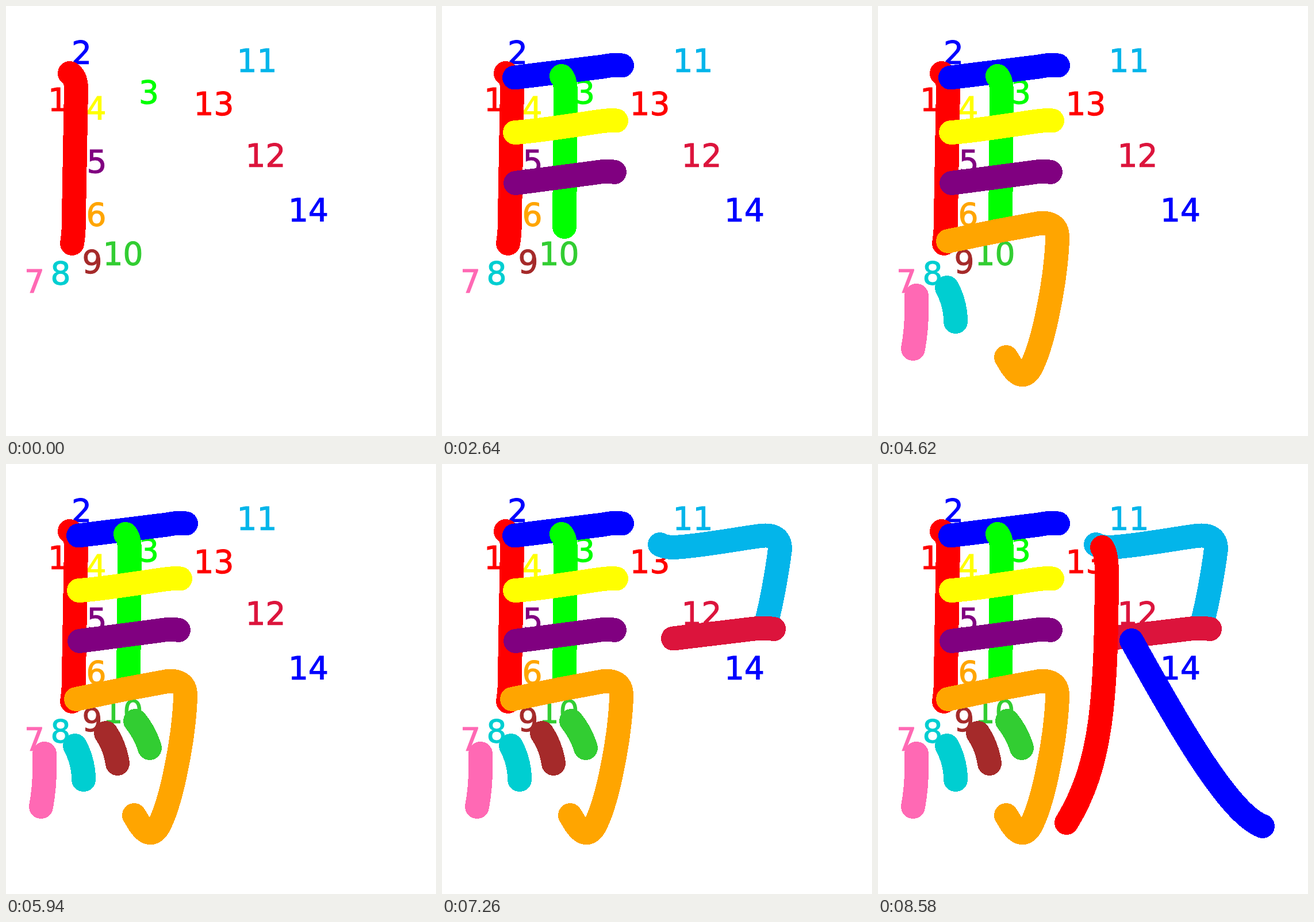
Animation, 748 px wide and 748 px high, one loop 9240 ms. Source, as an HTML page:

```html
<!DOCTYPE html>
<html lang="ja">
<head>
<meta charset="utf-8">
<title>Stroke order</title>
<style>
  @property --step { syntax: "<integer>"; inherits: true; initial-value: 1; }
  @keyframes draw { from { --step: 1; } to { --step: 15; } }

  html, body { margin: 0; width: 100%; height: 100%; overflow: hidden; background: #fff; }
  svg { display: block; width: 100%; height: 100%; animation: draw 9240ms steps(14) infinite; }
  text { font: 55px "DejaVu Sans", Verdana, sans-serif; stroke-width: 1.1; }
  path {
    fill: none; stroke-width: 42; stroke-linecap: round; stroke-linejoin: round;
    shape-rendering: crispEdges;
    opacity: clamp(0, var(--step) - var(--index), 1);
  }
</style>
</head>
<body>
<svg viewBox="0 0 748 748"><g id="labels"></g><g id="strokes"></g></svg>
<script>
  // Colour, label x, label baseline, centre line
  const strokes = [
    ["#f00", 73, 182, "M111 117Q122 124 122 144L117.5 390Q117 400 115 413"],
    ["#00f", 114, 100, "M126 124.5L280 105.5Q303 101 313 103.5"],
    ["#0f0", 231, 168.5, "M208 122Q215 129 215 150L213 384"],
    ["#ff0", 139.5, 197, "M127 220Q145 219 190 213L270 201.5Q293 198 303 199.5"],
    ["#800080", 140.5, 289.5, "M128 308L265 290Q290 286 300 289"],
    ["#ffa500", 139.5, 382, "M122 409L205 392L270 380C300 373 313 383 312 405C310 470 290 580 268 625Q253 657 232 626L223 611"],
    ["#ff69b4", 32, 498, "M67 504C68 535 67 565 61 596"],
    ["#00ced1", 77.5, 484, "M120 490Q135 518 135 549"],
    ["#a52a2a", 132.5, 463.5, "M174 468Q190 492 194 521"],
    ["#32cd32", 168.5, 449.5, "M225 447Q242 468 250 494"],
    ["#03b5ea", 401.5, 114, "M379 140Q388 145 403 145C450 143 520 129 555 125Q588 121 588 148C584 180 574 240 564 276"],
    ["#dc143c", 416.5, 279, "M402 303.5L535 287.5Q560 284 577 287"],
    ["#f00", 326.5, 188.5, "M390 145Q398 155 398 190C397 420 388 525 328 624"],
    ["#00f", 491, 374, "M441 307C520 450 610 608 669 630"],
  ];

  function add(parentId, tag, attributes) {
    const node = document.createElementNS(document.querySelector("svg").namespaceURI, tag);
    for (const [name, value] of Object.entries(attributes)) node.setAttribute(name, value);
    return document.getElementById(parentId).appendChild(node);
  }

  strokes.forEach(([color, x, y, d], index) => {
    add("labels", "text", { x, y, fill: color, stroke: color }).textContent = index + 1;
    add("strokes", "path", { d, stroke: color, style: `--index: ${index}` });
  });
</script>
</body>
</html>
```
